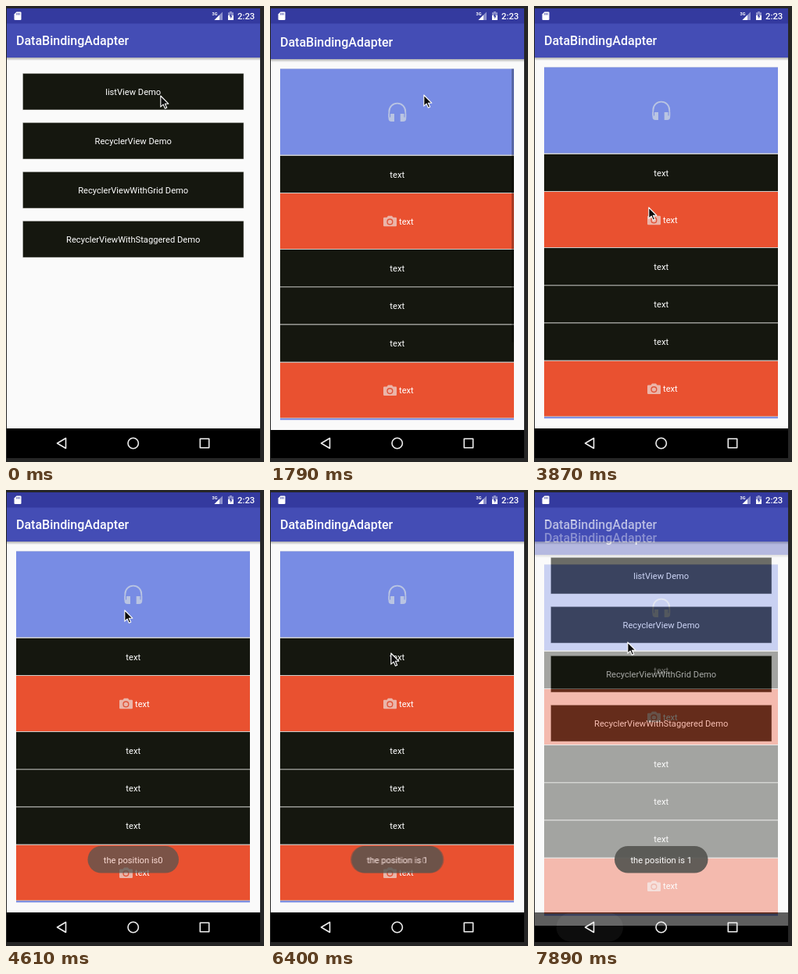
Recreate the animation shown at these times as an HTML page. Size 330 by 584 pixels, loop 8 s.

```html
<!DOCTYPE html>
<html lang="en">
<head>
<meta charset="utf-8">
<title>DataBindingAdapter</title>
<style>
html, body { margin: 0; width: 100%; height: 100%; overflow: hidden; background: #262626; }
svg { display: block; width: 330px; height: 584px; }
text { font: 11.15px Roboto, "Noto Sans", sans-serif; fill: #fff; }
.mid { text-anchor: middle; }
.title { font-size: 16px; font-weight: 500; }
.clock { font-size: 11.3px; font-weight: 500; }
.net { font-size: 5.5px; font-weight: 700; }
.dark { fill: #15170f; }
.blue { fill: #788ce4; }
.orange { fill: #e95130; }
.page { fill: #fafafa; }
.pill { fill: #555551; opacity: .92; }

#list, #bar, #toast0, #toast1, #ripple, #cursor { animation: 8s step-end infinite; }
#list { animation-name: list; }
#bar { animation-name: bar; }
#toast0 { animation-name: toast0; }
#toast1 { animation-name: toast1; }
#ripple { animation-name: ripple; }
#cursor { animation-name: cursor; }

@keyframes list {
  0% { opacity: 0; transform: translateY(2px); }
  22.37% { opacity: 1; transform: translateY(2px); }
  24.12% { opacity: 1; transform: none; }
  98.62% { opacity: .38; transform: translateY(17px); }
}
@keyframes bar {
  0% { opacity: 1; }
  33.49% { opacity: .5; }
  35.37%, 100% { opacity: 0; }
}
@keyframes toast0 {
  0% { opacity: 0; }
  55.74% { opacity: .35; }
  57.62% { opacity: .8; }
  59.49% { opacity: 1; }
  79.99% { opacity: .7; }
  81.87%, 100% { opacity: 0; }
}
@keyframes toast1 {
  0% { opacity: 0; }
  79.99% { opacity: .55; }
  81.87%, 100% { opacity: 1; }
}
@keyframes ripple {
  0% { opacity: 0; }
  93.12% { opacity: .6; }
  94.87% { opacity: 1; }
  98.62%, 100% { opacity: .45; }
}
@keyframes cursor {
  0% { transform: translate(197px, 114px); }
  1.87% { transform: translate(196px, 113px); }
  33.49% { transform: translate(190px, 122px); }
  35.37% { transform: translate(167px, 160px); }
  37.24% { transform: translate(141px, 215px); }
  38.99% { transform: translate(125px, 262px); }
  40.87% { transform: translate(122px, 284px); }
  42.74% { transform: translate(129px, 286px); }
  44.62% { transform: translate(141px, 276px); }
  46.49% { transform: translate(148px, 266px); }
  48.37% { transform: translate(146px, 257px); }
  50.12% { transform: translate(147px, 195px); }
  51.99% { transform: translate(151px, 153px); }
  61.24% { transform: translate(151px, 158px); }
  63.12% { transform: translate(153px, 180px); }
  64.99% { transform: translate(155px, 200px); }
  66.87% { transform: translate(155px, 207px); }
  79.99% { transform: translate(154px, 208px); }
  83.74% { transform: translate(148px, 250px); }
  85.62% { transform: translate(128px, 350px); }
  87.49% { transform: translate(96px, 470px); }
  89.37% { transform: translate(74px, 540px); }
  91.24% { transform: translate(67px, 554px); }
  94.87% { transform: translate(76px, 520px); }
  96.74% { transform: translate(110px, 375px); }
  98.62%, 100% { transform: translate(119px, 194px); }
}
</style>
</head>
<body>
<svg viewBox="0 0 330 584">
  <defs>
    <linearGradient id="shade" x2="0" y2="1">
      <stop stop-color="#000" stop-opacity=".3"/>
      <stop offset="1" stop-color="#000" stop-opacity="0"/>
    </linearGradient>
    <g id="window">
      <rect class="page" x="1" y="22" width="324" height="519"/>
      <rect x="1" y="22" width="324" height="44" fill="#444db5"/>
      <rect x="1" y="66" width="324" height="4" fill="url(#shade)"/>
      <text class="title" x="13" y="50">DataBindingAdapter</text>
    </g>
    <g id="camera">
      <path d="M146.2 268.8h3.3l1.5-2h5l1.5 2h3.3q1.2 0 1.2 1.2v9q0 1.2-1.2 1.2h-14.6q-1.2 0-1.2-1.2v-9q0-1.2 1.2-1.2z" fill="#ebb5a9"/>
      <circle cx="153.4" cy="274.4" r="3.4" fill="#ebb5a9" stroke="#e0553a" stroke-width="1.4"/>
      <text x="165" y="277.5">text</text>
    </g>
  </defs>

  <rect x="1" y="541" width="324" height="38"/>
  <rect id="ripple" x="28.5" y="541.5" width="85.5" height="37" rx="18.5" fill="#1f1f1f"/>

  <g id="menu">
    <use href="#window"/>
    <g class="dark" stroke="#d0d0cc" stroke-width=".5">
      <rect x="21.5" y="86.3" width="282.5" height="46.7"/>
      <rect x="21.5" y="149.3" width="282.5" height="46.7"/>
      <rect x="21.5" y="212.3" width="282.5" height="46.7"/>
      <rect x="21.5" y="275.3" width="282.5" height="46.7"/>
    </g>
    <g class="mid">
      <text x="162.7" y="114">listView Demo</text>
      <text x="162.7" y="177">RecyclerView Demo</text>
      <text x="162.7" y="240">RecyclerViewWithGrid Demo</text>
      <text x="162.7" y="303">RecyclerViewWithStaggered Demo</text>
    </g>
  </g>

  <g id="list">
    <use href="#window"/>
    <g>
      <rect x="13" y="78.5" width="299" height="449.5" fill="#cdcdca"/>
      <rect class="blue" x="13" y="78.5" width="299" height="110"/>
      <rect class="dark" x="13" y="190" width="299" height="47"/>
      <rect class="orange" x="13" y="238" width="299" height="71"/>
      <rect class="dark" x="13" y="310" width="299" height="47.3"/>
      <rect class="dark" x="13" y="358.3" width="299" height="47"/>
      <rect class="dark" x="13" y="406.4" width="299" height="47.2"/>
      <rect class="orange" x="13" y="454.8" width="299" height="70.6"/>
      <rect class="blue" x="13" y="526.2" width="299" height="2"/>
    </g>
    <path d="M152.4 140.5V133a10.4 10.4 0 0 1 20.8 0v7.5" fill="none" stroke="#b9c4e2" stroke-width="1.9"/>
    <path d="M151.5 136H159v10h-3.5q-4 0-4-4zM166.7 136h7.5v6q0 4-4 4h-3.5z" fill="#b9c4e2"/>
    <path d="M153.6 134.5v6M172 134.5v6" stroke="#788ce4" stroke-width="1"/>
    <g class="mid">
      <text x="162.7" y="217.5">text</text>
      <text x="162.7" y="337.7">text</text>
      <text x="162.7" y="386">text</text>
      <text x="162.7" y="434">text</text>
    </g>
    <use href="#camera"/>
    <use href="#camera" y="216.7"/>
    <rect id="bar" x="309" y="78.5" width="3" height="350" fill="#000" fill-opacity=".28"/>
  </g>

  <g id="status">
    <rect x="1" y="3" width="324" height="19.5" fill="#343a9f"/>
    <path d="M13.5 7.5h5q1 0 1 1v8.500q0 1-1 1h-7q-1 0-1-1V10.500z" fill="#fff"/>
    <path d="M13.700 9v2.500M15.500 9v2.500M17.300 9v2.500" stroke="#343a9f" stroke-width=".8"/>
    <text class="net" x="263.500" y="11.500">3G</text>
    <path d="M277 7.500V18H266.500z" fill="#8d91cc"/>
    <path d="M273 11.500V18h-6.500z" fill="#fff"/>
    <path d="M286 7h3v1.300h2V18h-7V8.300h2z" fill="#8d91cc"/>
    <path d="M284 12h7v6h-7z" fill="#fff"/>
    <path d="M288 9.500l-2.300 4h1.600v3l2.200-4H288z" fill="#343a9f"/>
    <text class="clock" x="296" y="17">2:23</text>
  </g>

  <g fill="none" stroke="#eee" stroke-width="1.6" stroke-linejoin="round">
    <path d="M65.500 560l11-6.500v13z"/>
    <circle cx="162.700" cy="560" r="6.700"/>
    <rect x="248.300" y="554.300" width="11.400" height="11.400"/>
  </g>

  <g id="toast0">
    <rect class="pill" x="104.500" y="456" width="116.500" height="34.500" rx="17.250"/>
    <text class="mid" x="162.700" y="477.700">the position is0</text>
  </g>
  <g id="toast1">
    <rect class="pill" x="103" y="456" width="119.500" height="34.500" rx="17.250"/>
    <text class="mid" x="162.700" y="477.700">the position is 1</text>
  </g>

  <path id="cursor" d="M.8 1v14.200l3.300-3.100 2.300 5.100 2.300-1-2.300-5h4.400z" fill="#0c0c0c" stroke="#fff" stroke-width="1.100" stroke-linejoin="round"/>
</svg>
</body>
</html>
```
